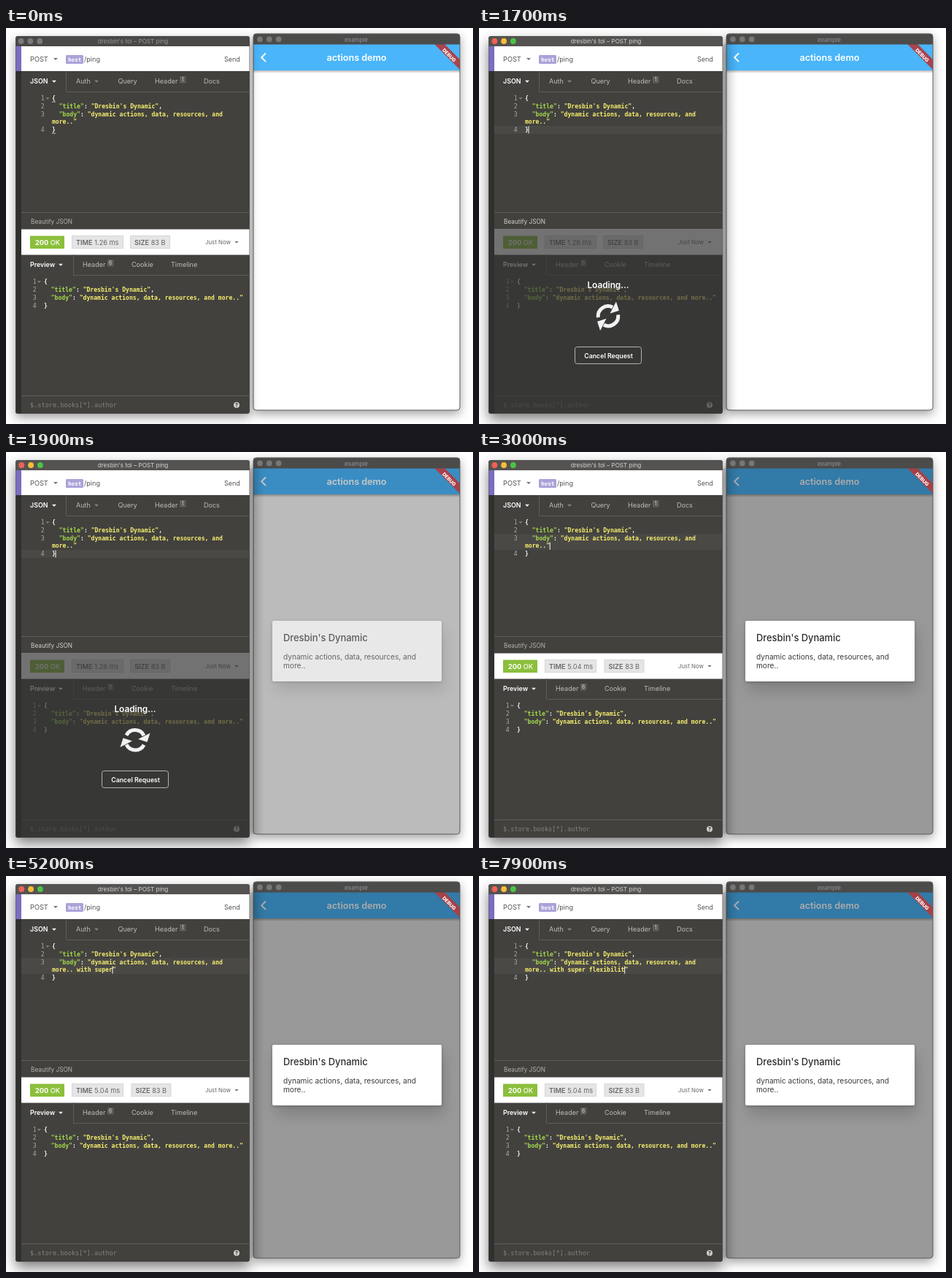
An HTML page that plays this animation: 640 by 542 pixels, repeating every 8000 ms.

```html
<!DOCTYPE html>
<html lang="en">
<head>
<meta charset="utf-8">
<title>Actions demo</title>
<style>
  html, body { margin: 0; width: 100%; height: 100%; overflow: hidden; background: #fff; }
  svg { display: block; width: 100vw; height: 100vh; }
  text { font-family: Inter, "Open Sans", sans-serif; white-space: pre; }
  .mono { font: bold 8.1px "DejaVu Sans Mono", "Liberation Mono", monospace; fill: #f4f4ee; }
  .num { font-weight: 400; fill: #a9a8a2; }
  .key { fill: #a3da4c; }
  .str { fill: #f6ee6e; }
  .b { font-weight: 600; }
  .m { font-weight: 500; }
  .line { stroke: #5e5d59; stroke-width: 1; fill: none; }
</style>
</head>
<body>
<svg id="stage" viewBox="0 0 640 542" preserveAspectRatio="none"></svg>
<script>
const LOOP = 8000, TICK = 100;
const PITCH = 8.1 * 0.602, ROW = 10.8;
const BRAND = "Dresbin's Dynamic";
const BODY = "dynamic actions, data, resources, and";
const EXTRA = " with super flexibilit";

const rect = (x, y, w, h, fill, more = "") =>
  `<rect x="${x}" y="${y}" width="${w}" height="${h}" fill="${fill}" ${more}/>`;
const text = (x, y, size, fill, str, more = "") =>
  `<text x="${x}" y="${y}" font-size="${size}" fill="${fill}" ${more}>${str}</text>`;
const mono = (x, y, str, cls = "", more = "") =>
  `<text class="mono ${cls}" x="${x}" y="${y}" ${more}>${str}</text>`;
const line = d => `<path class="line" d="${d}"/>`;
const arrow = (x, y, fill, s = 3) =>
  `<path d="M${x - s} ${y - s / 2}h${2 * s}l${-s} ${s}z" fill="${fill}"/>`;
const lights = (x, y, fills) =>
  fills.map((f, i) => `<circle cx="${x + i * 12.8}" cy="${y}" r="3.9" fill="${f}"/>`).join("");
const pair = (key, value) =>
  `<tspan class="key">"${key}"</tspan>: <tspan class="str">${value}</tspan>`;
const gutter = (x, y, n) => mono(x, y, n, "num", 'text-anchor="end"');
const fold = (x, y) => arrow(x, y, "#85847f", 2.6);

function badge(x, y, n) {
  return rect(x, y, 8.5, 9.5, "#5f5e5a", 'rx="1"') +
    text(x + 4.2, y + 7.4, 7, "#d0d0cc", n, 'text-anchor="middle"');
}

function tabs(y, active, arrowX, edge, names) {
  return text(33, y + 17.2, 8.85, "#fff", active, 'class="b"') + arrow(arrowX, y + 14.2, "#fff") +
    names.map(([x, s]) => text(x, y + 17.2, 9.05, "#bcbbb7", s)).join("") +
    line(`M${edge} ${y}v28.5H333`);
}

function phone() {
  const back = '<path d="M356 34.5l-5.8 5.8 5.8 5.8" fill="none" stroke="#fff" stroke-width="2"/>';
  return rect(339, 7.5, 283, 515.5, "#fff", 'rx="4" style="filter:drop-shadow(0 5px 7px rgba(0,0,0,.38))"') +
    '<g clip-path="url(#phoneClip)">' +
    rect(339, 58, 283, 465, "#fff") +
    '<rect x="339" y="58" width="283" height="4" fill="url(#barShade)"/>' +
    rect(339, 22, 283, 36, "#4ab5f9") + back +
    text(480.5, 45, 12.6, "#fff", "actions demo", 'class="b" text-anchor="middle"') +
    rect(339, 22, 283, 36, "#000", 'id="barScrim"') +
    rect(339, 58, 283, 465, "#000", 'id="scrim"') +
    '<path d="M587 22h14l21 21v14z" fill="#b03c40" fill-opacity=".93"/>' +
    text(0, 2.4, 6.7, "#fff", "DEBUG", 'font-weight="800" text-anchor="middle" transform="translate(607.3 37.2) rotate(45)"') +
    rect(339, 7.5, 283, 15, "#4b4b4a") + lights(348, 15.4, Array(3).fill("#777775")) +
    text(480, 18.5, 8, "#94949a", "example", 'text-anchor="middle"') +
    "</g>" +
    '<g id="dialog">' +
    rect(365, 231, 232, 83, "#fff", 'rx="2" style="filter:drop-shadow(4px 13px 10px rgba(0,0,0,.13)) drop-shadow(0 1px 2px rgba(0,0,0,.25))"') +
    text(380, 258.7, 12.9, "#2c2c2c", BRAND, 'class="m"') +
    text(380, 284.2, 10.15, "#3a3a3a", BODY) + text(380, 296.4, 10.15, "#3a3a3a", "more..") +
    "</g>" +
    rect(339, 8, 283, 515, "none", 'rx="4" stroke="#5d5d5d" stroke-width="1"');
}

function editor() {
  const y = i => 99 + i * ROW, x = 63;
  return rect(21, 112.3, 312, 0, "#4a4946", 'id="activeRow"') +
    [[0, 1], [1, 2], [2, 3], [4, 4]].map(([i, n]) => gutter(52.5, y(i), n)).join("") + fold(57, 96.5) +
    mono(x, y(0), "{") +
    mono(x, y(1), `  ${pair("title", `"${BRAND}"`)},`) +
    mono(x, y(2), "  " + pair("body", `"${BODY}`)) +
    mono(x, y(3), "", "str", 'id="typed"') +
    mono(x, y(4), "}") +
    `<path id="match" d="M63 101.2h5M63 144.2h5" stroke="#ddd" stroke-width=".8"/>` +
    rect(0, 0, 1, 10, "#fff", 'id="caret"');
}

function response() {
  const y = i => 350.1 + i * ROW;
  const chip = (x, w) => rect(x + .5, 284.5, w, 17, "#e5e5e5", 'stroke="#d6d6d6"');
  const label = (x, name, value, id) =>
    text(x, 296.6, 9.2, "#666", `<tspan class="b">${name}</tspan> <tspan id="${id}">${value}</tspan>`);
  return rect(21, 275.5, 313, 35, "#fff") +
    rect(33, 284.5, 47, 17.5, "#8bbf3c") +
    text(40, 296.6, 9.2, "#fff", '<tspan font-weight="700">200</tspan> <tspan class="m">OK</tspan>') +
    chip(90, 70) + label(96, "TIME", "1.26 ms", "time") +
    `<g id="size">${chip(170, 54)}${label(176, "SIZE", "83 B", "bytes")}</g>` +
    text(273, 296.2, 7.85, "#666", "Just Now") + arrow(316, 293.3, "#666", 2.6) +
    tabs(310, "Preview", 75, 92.5, [[105, "Header"], [172, "Cookie"], [226, "Timeline"]]) +
    badge(139, 317, 6) +
    [0, 1, 2, 3].map(i => gutter(41.5, y(i), i + 1)).join("") + fold(45.3, 347.5) +
    mono(52, y(0), "{") +
    mono(52, y(1), `  ${pair("title", `"${BRAND}"`)},`) +
    mono(52, y(2), "  " + pair("body", `"${BODY} more.."`)) +
    mono(52, y(3), "}") +
    line("M21 503.5H333") +
    mono(33, 518.8, "$.store.books[*].author", "", 'style="font-size:8.6px;font-weight:400;fill:#83827d"') +
    '<circle cx="316" cy="516" r="4" fill="#d0d0cc"/>' +
    text(316, 518.6, 7, "#42413e", "?", 'font-weight="800" text-anchor="middle"');
}

function loading() {
  const half = '<path d="M-13.5 -2.5A13.5 13.5 0 0 1 9.5 -9.5" fill="none" stroke="#f2f2f2" stroke-width="5"/>' +
    '<path d="M16.5 -15.5v13h-13z" fill="#f2f2f2"/>';
  return '<g id="loading">' + rect(21, 275.5, 313, 252, "#343433", 'fill-opacity=".69"') +
    text(177, 356.4, 11.8, "#fff", "Loading...", 'class="b" text-anchor="middle"') +
    `<g id="spin">${half}<g transform="rotate(180)">${half}</g></g>` +
    rect(131.5, 436.5, 91, 23, "none", 'rx="3" stroke="#b4b4b2"') +
    text(177.5, 451.7, 8.8, "#fff", "Cancel Request", 'class="b" text-anchor="middle"') +
    "</g>";
}

function client() {
  return rect(13, 11, 321, 517, "#444", 'id="clientShadow" rx="4"') +
    '<rect id="castShade" x="334" y="22" width="20" height="501" fill="url(#cast)"/>' +
    '<g clip-path="url(#clientClip)">' +
    rect(13, 11, 321, 517, "#42413e") +
    rect(13, 25, 8, 503, "#30302e") + rect(13, 25, 8, 34, "#7b6dbf") +
    rect(13, 11, 321, 14, "#4a4947", 'id="titleBar"') +
    `<g id="dim">${lights(20.6, 18, Array(3).fill("#7b7a78"))}</g>` +
    `<g id="lit">${lights(21.3, 18, ["#f25f58", "#f8be36", "#4cc544"])}</g>` +
    text(174, 21.2, 8.13, "#999", "dresbin's tol – POST ping", 'id="title" text-anchor="middle"') +
    rect(21, 25, 313, 34, "#fff") +
    text(33, 45.6, 9.25, "#555", "POST") + arrow(68, 42.5, "#777") +
    rect(82, 37, 24, 12, "#aaa2d8", 'rx="1.5"') +
    mono(85, 45.6, "host", "", 'style="font-size:7.6px;fill:#fff"') +
    text(107, 45.6, 9.1, "#555", "/ping") + text(299, 45.6, 9, "#555", "Send") +
    tabs(59, "JSON", 66, 82.5, [[96, "Auth"], [153.5, "Query"], [204, "Header"], [271, "Docs"]]) +
    arrow(124, 73.2, "#85847f") + badge(238, 66, 1) +
    editor() + line("M21 252.5H333") +
    text(34, 268, 8.25, "#b4b3af", "Beautify JSON", 'id="beautify"') +
    response() + loading() + "</g>" +
    rect(13.5, 11.5, 320, 516, "none", 'rx="4" stroke="#555" stroke-opacity=".5"');
}

const stage = document.getElementById("stage");
stage.innerHTML = `<defs>
  <clipPath id="phoneClip"><rect x="339" y="7.5" width="283" height="515.5" rx="4"/></clipPath>
  <clipPath id="clientClip"><rect x="13" y="11" width="321" height="517" rx="4"/></clipPath>
  <linearGradient id="barShade" x2="0" y2="1"><stop stop-opacity=".28"/><stop offset="1" stop-opacity="0"/></linearGradient>
  <linearGradient id="cast"><stop stop-opacity=".12"/><stop offset="1" stop-opacity="0"/></linearGradient>
</defs>` + phone() + client();

const el = {};
stage.querySelectorAll("[id]").forEach(n => el[n.id] = n);
const set = (id, attrs) => { for (const k in attrs) el[id].setAttribute(k, attrs[k]); };
const show = (id, on) => set(id, { opacity: +on });
const clamp = v => Math.max(0, Math.min(1, v));

// Typing bursts: start, end, number of characters
const BURSTS = [[3600, 5100, 11], [5500, 6600, 5], [6900, 7850, 6]];
const KEYS = BURSTS.flatMap(([a, b, n]) =>
  Array.from({ length: n }, (_, i) => a + (b - a) * i / (n - 1)));
const FOCUS = 400, CLICK = 1400, SEND = 1600, OPEN = 1700, DONE = 2100, MOVE = 2700, LEFT = 3200;
const EVENTS = [CLICK, MOVE, LEFT, ...KEYS];

function draw(t) {
  const active = t >= FOCUS, busy = t >= SEND && t < DONE;
  show("dim", !active);
  show("lit", active);
  show("castShade", active);
  set("titleBar", { fill: active ? "#555351" : "#4a4947" });
  set("title", { fill: active ? "#d6d5d3" : "#9a9996" });
  el.clientShadow.style.filter = active
    ? "drop-shadow(0 8px 9px rgba(0,0,0,.5))" : "drop-shadow(0 5px 7px rgba(0,0,0,.38))";

  const typed = KEYS.filter(k => k <= t).length;
  el.typed.textContent = "more.." + EXTRA.slice(0, typed) + '"';
  const last = EVENTS.filter(e => e <= t).pop();
  const atBody = t >= MOVE;
  const col = !atBody ? 1 : t < LEFT ? 7 : 6 + typed;
  set("caret", { x: 63 + col * PITCH - .4, y: atBody ? 123.6 : 134.4 });
  show("caret", last !== undefined && (t - last) % 1060 < 530);
  set("activeRow", { y: atBody ? 112.3 : 134, height: t < CLICK ? 0 : atBody ? 2 * ROW : ROW });
  show("match", t < CLICK);

  const fade = clamp((t - OPEN) / 300);
  set("scrim", { opacity: .4 * fade });
  set("barScrim", { opacity: .33 * fade });
  set("dialog", { opacity: fade });

  set("loading", { opacity: busy ? clamp((t - SEND + 50) / 100) : 0 });
  set("spin", { transform: `translate(177 394.3) rotate(${(t - SEND) * .18 - 36})` });
  set("beautify", { fill: busy ? "#d2d1cd" : "#b4b3af" });
  el.time.textContent = t < DONE ? "1.26 ms" : "5.04 ms";
  set("size", { transform: `translate(${t < DONE ? 0 : 1.5} 0)` });
}

const start = performance.now();
function frame(now) {
  const t = Math.max(0, now - start) % LOOP;
  draw(Math.floor(t / TICK) * TICK);
  requestAnimationFrame(frame);
}
draw(0);
requestAnimationFrame(frame);
</script>
</body>
</html>
```
